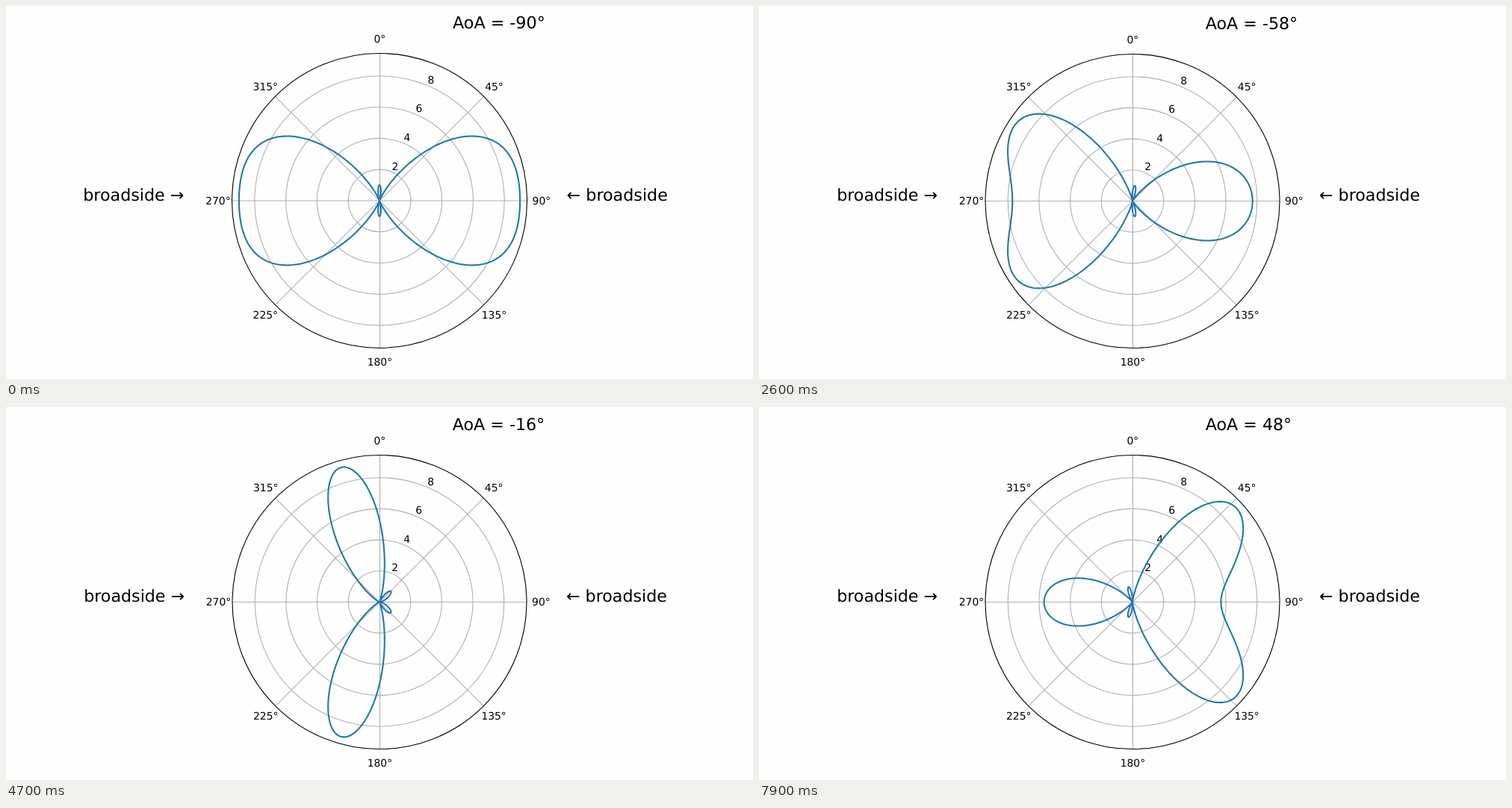
Recreate the animation shown at these times as an HTML page. Size 1000 px wide and 500 px high, loop 8 s.

```html
<!DOCTYPE html>
<html lang="en">
<head>
<meta charset="utf-8">
<title>Beam pattern against angle of arrival</title>
<style>
  html, body { margin: 0; width: 100%; height: 100%; overflow: hidden; background: #fefefe; }
  svg { display: block; width: 100%; height: 100%; }
  text { font-family: "DejaVu Sans", sans-serif; text-rendering: geometricPrecision; }
  .tick { font-size: 13.89px; }
  .note { font-size: 22.22px; }
  .grid { fill: none; stroke: #b0b0b0; stroke-width: 1.11; }
  .rim { fill: none; stroke: #000; stroke-width: 1.11; }
  .beam { fill: none; stroke: #1f77b4; stroke-width: 2.08; stroke-linejoin: round; }
</style>
</head>
<body>
<svg viewBox="0 0 1000 500"><g id="plot"></g></svg>
<script>
const LOOP = 8000, STEP = 100, HOLD = 10;
const CX = 500, CY = 260.95, UNIT = 20.9, RIM = 197.5, LABEL = 216.5;
const RAD = Math.PI / 180;
const plot = document.getElementById('plot');

function add(tag, attrs, text) {
  const el = document.createElementNS('http://www.w3.org/2000/svg', tag);
  for (const key in attrs) el.setAttribute(key, attrs[key]);
  if (text) el.textContent = text;
  return plot.appendChild(el);
}

// Compass angles: 0 is up, growing clockwise.
function polar(deg, r) {
  return [CX + r * Math.sin(deg * RAD), CY - r * Math.cos(deg * RAD)];
}

for (let deg = 0; deg < 360; deg += 45) {
  const [x2, y2] = polar(deg, RIM);
  const snap = deg % 180 ? 0 : 0.5; // keeps the upright spoke crisp
  add('line', { class: 'grid', x1: CX + snap, y1: CY, x2: x2 + snap, y2 });
  const [x, y] = polar(deg, LABEL);
  add('text', { class: 'tick', x: x + 0.4, y: y + 4.7, 'text-anchor': 'middle' }, deg + '°');
}
for (let r = 2; r <= 8; r += 2) {
  add('circle', { class: 'grid', cx: CX, cy: CY, r: r * UNIT });
  const [x, y] = polar(22.5, r * UNIT);
  add('text', { class: 'tick', x: x + 0.4, y: y - 2.8 }, String(r));
}
const beam = add('path', { class: 'beam' });
add('circle', { class: 'rim', cx: CX, cy: CY, r: RIM });
add('text', { class: 'note', x: 103.2, y: CY }, 'broadside →');
add('text', { class: 'note', x: 750.6, y: CY }, '← broadside');
const title = add('text', { class: 'note', x: 598, y: 30 });

// Power of three elements spaced half a wavelength apart.
function power(deg, aoa) {
  const phase = Math.PI * (Math.sin(deg * RAD) - Math.sin(aoa * RAD));
  return (1 + 2 * Math.cos(phase)) ** 2;
}

function beamPath(aoa) {
  const points = [];
  for (let deg = 0; deg < 360; deg += 0.5) {
    const [x, y] = polar(deg, UNIT * power(deg, aoa));
    points.push(x.toFixed(2) + ' ' + y.toFixed(2));
  }
  return 'M' + points.join('L') + 'Z';
}

let shown = -1;
function draw(time) {
  const step = Math.floor((time % LOOP) / STEP);
  if (step === shown) return;
  shown = step;
  const aoa = -90 + 2 * Math.max(0, step - HOLD);
  beam.setAttribute('d', beamPath(aoa));
  title.textContent = `AoA = ${aoa}°`;
  // The whole plot settles slightly smaller over the first steps.
  const scale = 1 - 0.0025 * Math.min(1, step / 4);
  plot.setAttribute('transform', `translate(500 470) scale(${scale}) translate(-500 -470)`);
}

const start = performance.now();
function tick() {
  draw(performance.now() - start);
  requestAnimationFrame(tick);
}
tick();
</script>
</body>
</html>
```
